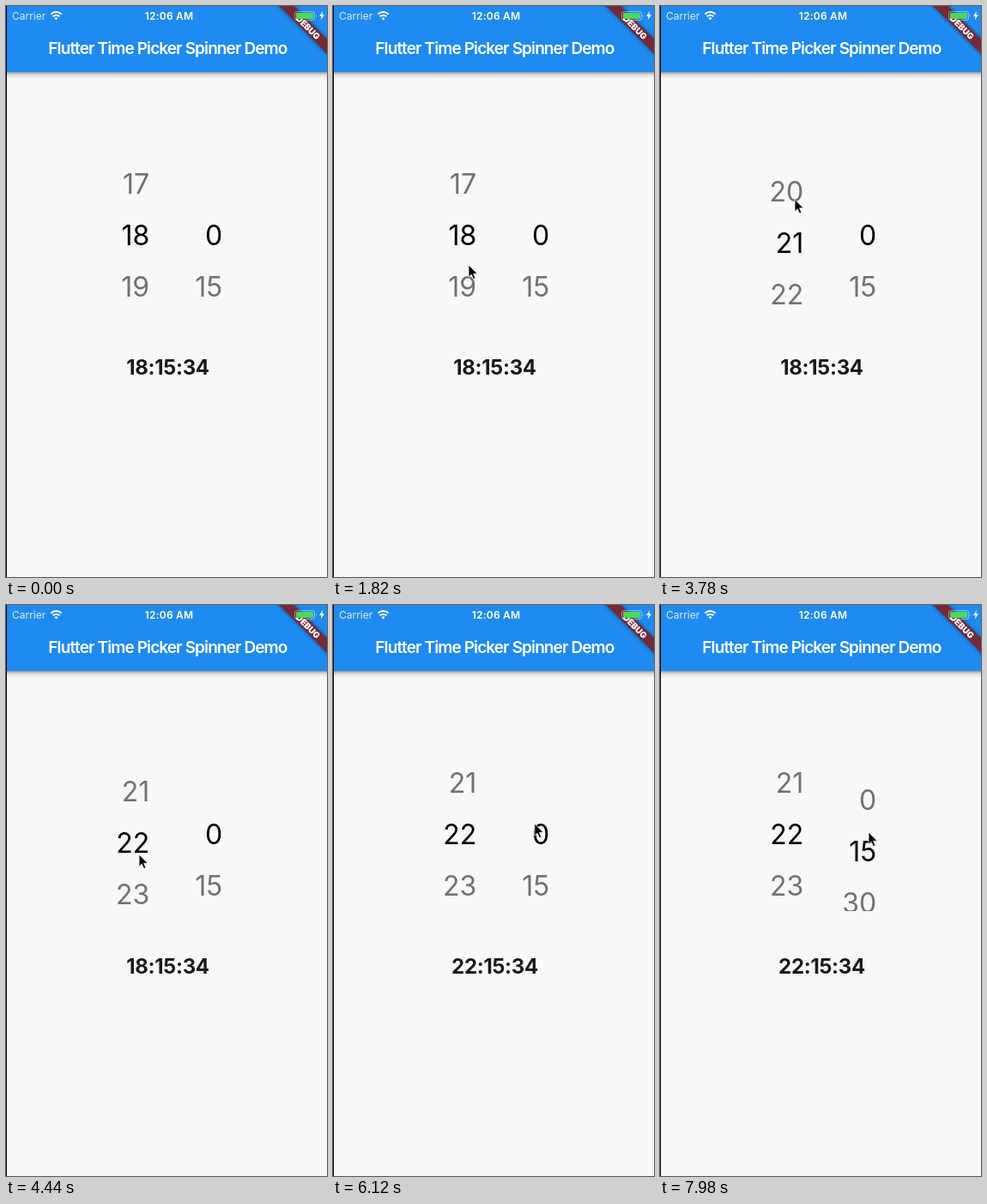
These frames come from a looping animation (374 px wide and 666 px high, 8 s). An HTML page:

```html
<!DOCTYPE html>
<html lang="en">
<head>
<meta charset="utf-8">
<title>Time picker spinner</title>
<style>
  html, body { margin: 0; width: 100%; height: 100%; overflow: hidden; background: #f8f8f8; }
  svg { display: block; width: 374px; height: 666px; font-family: Inter, "Liberation Sans", sans-serif; }
  .status { font-size: 12px; fill: #dcebfb; }
  .title { font-size: 19px; font-weight: 600; letter-spacing: -.9px; fill: #fff; }
  .wheel { font-size: 32px; text-anchor: end; fill: #727272; }
  .wheel .on { fill: #000; }
  .time { font-size: 24px; font-weight: 700; letter-spacing: -.3px; fill: #1a1a1a; }
  .mid { text-anchor: middle; }
</style>
</head>
<body>
<svg viewBox="0 0 374 666">
  <defs>
    <linearGradient id="shade" x2="0" y2="1">
      <stop stop-color="#444" stop-opacity=".55"/>
      <stop offset=".4" stop-color="#777" stop-opacity=".22"/>
      <stop offset="1" stop-color="#888" stop-opacity="0"/>
    </linearGradient>
    <filter id="soft" x="-20%" y="-60%" width="140%" height="220%">
      <feGaussianBlur stdDeviation="2.5"/>
    </filter>
    <clipPath id="window"><rect x="100" y="177" width="170" height="180"/></clipPath>
  </defs>

  <rect width="374" height="666" fill="#f8f8f8"/>
  <rect y="77" width="374" height="8" fill="url(#shade)"/>
  <rect width="374" height="77" fill="#1f8bf0"/>
  <text class="title mid" x="188.4" y="56">Flutter Time Picker Spinner Demo</text>

  <g transform="translate(376 1) rotate(45)">
    <rect x="-45" y="28" width="90" height="12" opacity=".5" filter="url(#soft)"/>
    <rect x="-45" y="28" width="90" height="12" fill="#742a38"/>
    <text class="mid" y="37.7" font-size="10" font-weight="900" fill="#fff">DEBUG</text>
  </g>

  <text class="status" x="7" y="16">Carrier</text>
  <g fill="none" stroke="#fff" stroke-width="2">
    <path d="M52.3 9.6a8.8 8.8 0 0 1 12.4 0M54.7 12.2a5.4 5.4 0 0 1 7.6 0"/>
    <path d="M58.5 16.5l-2-2.3a3 3 0 0 1 4 0z" fill="#fff" stroke="none"/>
  </g>
  <text class="status mid" x="190" y="16" font-weight="600" letter-spacing=".2" style="fill:#fff">12:06 AM</text>
  <rect x="336.5" y="6.5" width="23" height="10" rx="2.5" fill="none" stroke="#fff" stroke-opacity=".45"/>
  <rect x="338" y="8" width="20" height="7" rx="1.2" fill="#4cd95a"/>
  <path d="M361 9.8q1.8 1.7 0 3.4z" fill="#fff" fill-opacity=".5"/>
  <path d="M369 6l-4 6h2.6l-.9 4.5 4.3-6.2h-2.7z" fill="#fff"/>

  <g clip-path="url(#window)">
    <g class="wheel" id="hours"></g>
    <g class="wheel" id="minutes"></g>
  </g>
  <text class="time mid" id="time" x="188.5" y="430.3"></text>

  <rect width="1" height="666" fill="#000"/>
  <path id="cursor" d="M0 0V14.2L3.2 11.2L5.6 16.6L8 15.5L5.6 10.3H10.2Z" stroke="#fff" stroke-width=".8"/>
</svg>

<script>
const LOOP = 8000, ROW = 60, SLOP = 18, REST = 4 * ROW;
const HOUR_DRAG = { start: 2500, end: 3425, y: 305 };
const MINUTE_DRAG = { start: 7480, y: 323 };
const SPRING = { slow: .00323, fast: .00878 }; // decay rates per ms
const byId = id => document.getElementById(id);

// Pointer path: time, x, y
const path = [
  [980, 140, 675], [1260, 150, 430], [1680, 157, 305], [1820, 158, 302],
  [2500, 158, 305], [2680, 159, 287], [3080, 159, 242], [3425, 158, 204],
  [3560, 158, 196], [4000, 156, 255], [4387, 155, 291], [4800, 178, 298],
  [5227, 224, 275], [5700, 234, 262], [6120, 235, 254], [6720, 238, 290],
  [7480, 241, 323], [7640, 241, 304], [7980, 243, 265]
];

function pointerAt(t) {
  const next = path.findIndex(p => p[0] > t);
  if (next < 0) return path[path.length - 1].slice(1);
  if (next === 0) return path[0].slice(1);
  const [t0, x0, y0] = path[next - 1], [t1, x1, y1] = path[next];
  const k = (t - t0) / (t1 - t0);
  return [x0 + (x1 - x0) * k, y0 + (y1 - y0) * k];
}

function dragged(drag, t) {
  return t < drag.start ? 0 : Math.max(0, drag.y - SLOP - pointerAt(t)[1]);
}

// After the flick an overdamped spring carries the hours to their resting row.
function hourScroll(t) {
  const { end } = HOUR_DRAG, { slow, fast } = SPRING;
  if (t <= end) return dragged(HOUR_DRAG, t);
  const from = dragged(HOUR_DRAG, end);
  const speed = (from - dragged(HOUR_DRAG, end - 100)) / 100;
  const gap = REST - from, weight = (fast * gap - speed) / (fast - slow);
  const left = weight * Math.exp(-slow * (t - end)) + (gap - weight) * Math.exp(-fast * (t - end));
  return left < .35 ? REST : REST - left;
}

// A wheel's first label rests `offset` rows from the centre line.
function makeWheel(id, right, labels, offset) {
  const rows = labels.map(label => {
    const row = document.createElementNS("http://www.w3.org/2000/svg", "text");
    row.textContent = label;
    row.setAttribute("x", right);
    byId(id).append(row);
    return row;
  });
  return scroll => rows.forEach((row, i) => {
    const shift = (i + offset) * ROW - scroll;
    row.setAttribute("y", 278.6 + shift);
    row.classList.toggle("on", Math.abs(shift) < ROW / 2);
  });
}

const turnHours = makeWheel("hours", 167.2, [17, 18, 19, 20, 21, 22, 23], -1);
const turnMinutes = makeWheel("minutes", 252.3, [0, 15, 30, 45], 0);

// Three pictures per 140 ms, held for 100, 20 and 20 ms.
function stepped(t) {
  const phase = t % 140;
  const n = 3 * Math.floor(t / 140) + (phase >= 120 ? 2 : phase >= 100 ? 1 : 0);
  return n * 140 / 3;
}

function draw(now) {
  const t = stepped(now % LOOP);
  const [x, y] = pointerAt(t);
  const hours = hourScroll(t);
  byId("cursor").setAttribute("transform", `translate(${x} ${y})`);
  turnHours(hours);
  turnMinutes(dragged(MINUTE_DRAG, t));
  byId("time").textContent = (hours === REST ? 22 : 18) + ":15:34";
}

let begin;
function tick(now) {
  begin ??= now;
  draw(now - begin);
  requestAnimationFrame(tick);
}
draw(0);
requestAnimationFrame(tick);
</script>
</body>
</html>
```
